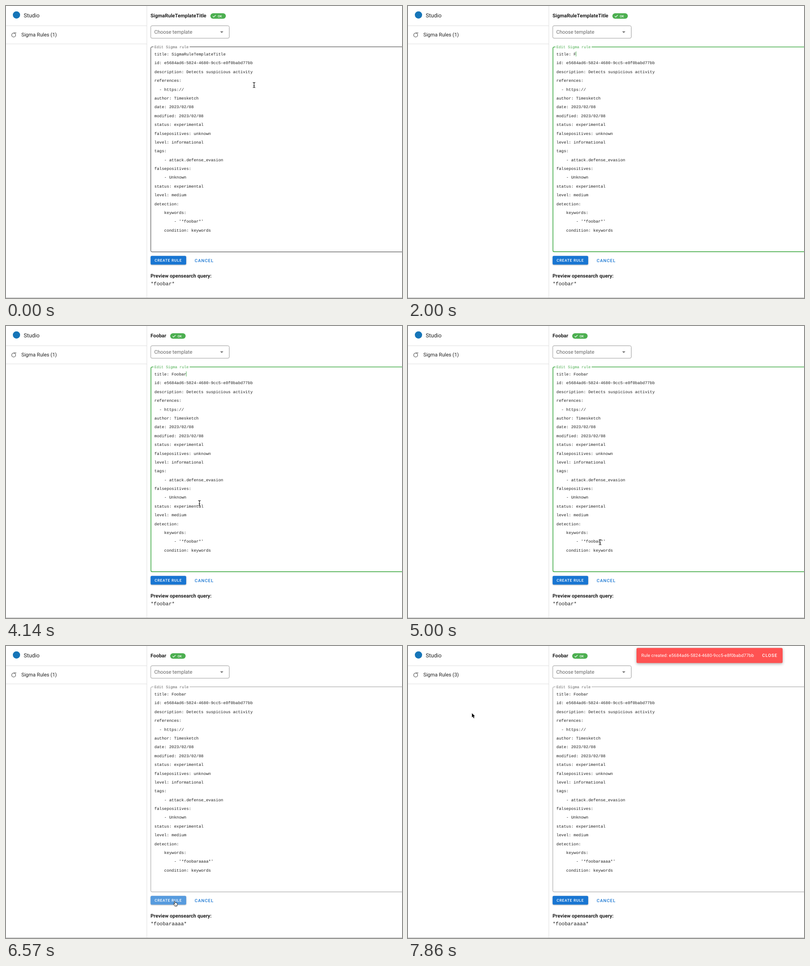
Recreate the animation shown at these times as an HTML page with a canvas. Size 870 by 643 pixels, loop 8000 ms.

```html
<!DOCTYPE html>
<html lang="en">
<head>
<meta charset="utf-8">
<title>Rule editor</title>
<style>
html, body { margin: 0; width: 100%; height: 100%; overflow: hidden; background: #fff; }
canvas { display: block; width: 870px; height: 643px; }
</style>
</head>
<body>
<canvas id="stage"></canvas>
<script>
const W = 870, H = 643, LOOP = 8000, STEP = 1000 / 7;
const canvas = document.getElementById('stage');
const ratio = window.devicePixelRatio || 1;
canvas.width = W * ratio;
canvas.height = H * ratio;
const ctx = canvas.getContext('2d');

const SANS = 'Roboto, sans-serif';
const MONO = '"Liberation Mono", monospace';
const GREEN = '#4caf50', BLUE = '#1976d2', INK = '#212121', MUTED = '#666', RULE = '#e0e0e0';
const UUID = 'e5684ad6-5824-4680-9cc5-e8f0babd77bb';
const CHAR = 5.4, LINE = 19.39, CODE_X = 326, CODE_Y = 109;

// Each track is a list of [start time, value]; a value holds until the next one.
const tracks = {
  name: [[0, 'SigmaRuleTemplateTitle'], [2000, 'F'], [2290, 'Foo'], [2570, 'Fooba'], [2860, 'Foobar']],
  heading: [[0, 'SigmaRuleTemplateTitle'], [3290, 'Foobar']],
  keyword: [[0, 'foobar'], [5140, 'foobara'], [5290, 'foobaraa'], [5430, 'foobaraaa'], [5570, 'foobaraaaa']],
  preview: [[0, '*foobar*'], [5860, '*foobaraaaa*']],
  border: [[0, 'hover'], [1000, 'focus'], [6430, 'idle'], [7570, 'hover'], [7710, 'idle']],
  selected: [[0, false], [1140, true], [2000, false]],
  caret: [[0, ''], [1000, 'name'], [1140, ''], [2000, 'name'], [3290, ''], [3710, 'name'], [4290, ''],
    [4710, 'name'], [4860, ''], [5140, 'keyword'], [6000, '']],
  shine: [[0, 0], [6000, .08], [6430, .18], [6570, .27], [6710, .18], [6860, .08], [7570, 0]],
  count: [[0, 1], [7000, 3]],
  toast: [[0, 0], [6710, .6], [6860, 1]],
  mouse: [[0, ['beam', 545, 174]], [430, ['beam', 530, 153]], [570, ['beam', 493, 117]],
    [710, ['beam', 479, 106]], [1000, ['beam', 428, 107]], [2000, null],
    [3710, ['beam', 428, 122]], [3860, ['beam', 428, 190]], [4000, ['beam', 427, 290]],
    [4140, ['beam', 425, 390]], [4290, ['beam', 423, 450]], [4430, ['beam', 422, 471]],
    [4570, ['beam', 422, 476]], [5140, null], [5570, ['beam', 501, 535]],
    [5710, ['hand', 428, 566]], [5860, ['hand', 385, 568]], [6000, ['hand', 374, 567]],
    [6140, ['hand', 372, 567]], [7570, ['beam', 335, 470]], [7710, ['arrow', 190, 236]],
    [7860, ['arrow', 140.5, 148]]]
};

function valueAt(track, t) {
  let value = track[0][1];
  for (const [start, next] of track) if (t >= start) value = next;
  return value;
}

function text(str, x, y, size, { color = INK, weight = 400, family = SANS, spacing = 0 } = {}) {
  ctx.font = `${weight} ${size}px ${family}`;
  ctx.letterSpacing = spacing + 'px';
  ctx.fillStyle = color;
  ctx.fillText(str, x, y);
}

function fillBox(x, y, w, h, color, radius = 0) {
  ctx.fillStyle = color;
  ctx.beginPath();
  ctx.roundRect(x, y, w, h, radius);
  ctx.fill();
}

function strokeLine(points, color, width) {
  ctx.strokeStyle = color;
  ctx.lineWidth = width;
  ctx.beginPath();
  points.forEach(([x, y], i) => i ? ctx.lineTo(x, y) : ctx.moveTo(x, y));
  ctx.stroke();
}

function drawSidebar(count) {
  fillBox(309, 0, 1, 642, RULE);
  fillBox(0, 43, 309, 1, RULE);
  fillBox(0, 83, 309, 1, RULE);
  fillBox(0, 642, W, 1, '#b5b5b5');
  ctx.fillStyle = '#1675b8';
  ctx.beginPath();
  ctx.arc(23, 19.7, 8, 0, 7);
  ctx.fill();
  text('Studio', 39, 25, 12.2);
  ctx.strokeStyle = MUTED;
  ctx.lineWidth = 1.3;
  ctx.beginPath();
  ctx.arc(16.8, 64, 4.3, 0, 7);
  ctx.stroke();
  strokeLine([[16.8, 59.2], [22.6, 59.2]], MUTED, 1.3);
  text(`Sigma Rules (${count})`, 33.8, 66.7, 11.1);
}

function drawHeader(heading) {
  text(heading, 317.5, 25, 11.04, { weight: 700 });
  const x = heading === 'Foobar' ? 360.7 : 449;
  fillBox(x, 16, 34, 12, GREEN, 6);
  strokeLine([[x + 5.2, 22.3], [x + 7.4, 24.4], [x + 11.8, 19.8]], '#fff', 1.1);
  text('OK', x + 16.3, 24.5, 6.9, { color: '#fff', weight: 500 });

  ctx.strokeStyle = '#9a9a9a';
  ctx.lineWidth = 1;
  ctx.beginPath();
  ctx.roundRect(318, 43.5, 172.5, 27.5, 3);
  ctx.stroke();
  text('Choose template', 325.7, 61, 11.04, { color: MUTED });
  ctx.fillStyle = '#757575';
  ctx.beginPath();
  ctx.moveTo(470.4, 55.8);
  ctx.lineTo(477.6, 55.8);
  ctx.lineTo(474, 59.4);
  ctx.fill();
}

function drawOutline(mode) {
  const color = { hover: '#333', focus: GREEN, idle: '#9a9a9a' }[mode];
  const wide = mode === 'focus' ? 1.7 : 1;
  const left = 317.6 + wide / 2, top = 89.4 + wide / 2, bottom = 542 - wide / 2;
  ctx.strokeStyle = color;
  ctx.lineWidth = wide;
  ctx.beginPath();
  ctx.moveTo(324, top);
  ctx.arcTo(left, top, left, bottom, 3);
  ctx.arcTo(left, bottom, W, bottom, 3);
  ctx.lineTo(W + 2, bottom);
  ctx.moveTo(403.5, top);
  ctx.lineTo(W + 2, top);
  ctx.stroke();
  text('Edit Sigma rule', 326, 93, 8.38, { family: MONO, color: mode === 'focus' ? GREEN : MUTED });
}

function drawEditor(s) {
  drawOutline(s.border);
  if (s.selected) fillBox(364, 96, 119, 19.5, '#b4d7ff');
  const lines = [
    'title: ' + s.name,
    'id: ' + UUID,
    'description: Detects suspicious activity',
    'references:',
    '  - https://',
    'author: Timesketch',
    'date: 2023/02/08',
    'modified: 2023/02/08',
    'status: experimental',
    'falsepositives: unknown',
    'level: informational',
    'tags:',
    '    - attack.defense_evasion',
    'falsepositives:',
    '    - Unknown',
    'status: experimental',
    'level: medium',
    'detection:',
    '    keywords:',
    `        - '*${s.keyword}*'`,
    '    condition: keywords'
  ];
  lines.forEach((line, i) => text(line, CODE_X, CODE_Y + i * LINE, 9, { family: MONO }));
  if (s.caret) {
    const onName = s.caret === 'name';
    const column = onName ? 7 + s.name.length : 12 + s.keyword.length;
    const row = onName ? 0 : 19;
    fillBox(CODE_X + column * CHAR - .6, CODE_Y - 9 + row * LINE, 1, 11, GREEN);
  }
}

function drawFooter(s) {
  ctx.save();
  ctx.shadowColor = 'rgba(0,0,0,.3)';
  ctx.shadowBlur = 2.5;
  ctx.shadowOffsetY = 1;
  fillBox(317.7, 550.3, 78.2, 19.3, BLUE, 2.8);
  ctx.restore();
  if (s.shine) fillBox(317.7, 550.3, 78.2, 19.3, `rgba(255,255,255,${s.shine})`, 2.8);
  text('CREATE RULE', 326.5, 563, 8.28, { color: '#fff', weight: 500, spacing: .74 });
  text('CANCEL', 414.5, 563.5, 9.66, { color: BLUE, weight: 500, spacing: .86 });
  text('Preview opensearch query:', 317.5, 598, 11.04, { weight: 700 });
  text(s.preview, 317.7, 615, 11.04, { family: MONO });
}

function drawToast(alpha) {
  if (!alpha) return;
  ctx.save();
  ctx.globalAlpha = alpha;
  ctx.save();
  ctx.shadowColor = 'rgba(0,0,0,.32)';
  ctx.shadowBlur = 6;
  ctx.shadowOffsetY = 2;
  fillBox(502, 4.3, 321, 33.2, '#ff5252', 2.8);
  ctx.restore();
  text('Rule created: ' + UUID, 512.6, 24.3, 9.66, { color: '#fff', spacing: .172 });
  text('CLOSE', 778, 24.3, 9.66, { color: '#fff', weight: 500, spacing: .86 });
  ctx.restore();
}

const pointers = {
  beam() {
    const shape = new Path2D('M-2.6-5.6Q0-5.6 0-4Q0-5.6 2.6-5.6M0-4V4.2M-2.6 5.8Q0 5.8 0 4.2Q0 5.8 2.6 5.8M-1.4 1.6H1.4');
    ctx.strokeStyle = '#fff';
    ctx.lineWidth = 2.4;
    ctx.stroke(shape);
    ctx.strokeStyle = '#111';
    ctx.lineWidth = 1.1;
    ctx.stroke(shape);
  },
  hand() {
    const shape = new Path2D('M-2.4-4.4Q-1.6-6-.6-4.4L.2-1.4Q1.2-2.2 1.8-1Q2.9-1.7 3.4-.5Q4.7-.8 4.8 .8L4.3 3.6L3.5 6H-.9Q-2 3.6-4.1 1.6Q-4.2 .1-2.7 .7L-1.4 1.8Z');
    ctx.fillStyle = '#fff';
    ctx.fill(shape);
    ctx.strokeStyle = '#111';
    ctx.lineWidth = .9;
    ctx.stroke(shape);
    strokeLine([[.6, 2.4], [.7, 4.6]], '#111', .6);
    strokeLine([[2.2, 2.4], [2.2, 4.6]], '#111', .6);
  },
  arrow() {
    const shape = new Path2D('M0 0V9.2L2.1 7.3L3.7 11L5.3 10.3L3.7 6.7H6.6Z');
    ctx.strokeStyle = '#fff';
    ctx.lineWidth = 1.4;
    ctx.stroke(shape);
    ctx.fillStyle = '#000';
    ctx.fill(shape);
  }
};

function drawMouse(mouse) {
  if (!mouse) return;
  const [kind, x, y] = mouse;
  ctx.save();
  ctx.translate(x, y);
  pointers[kind]();
  ctx.restore();
}

function draw(now) {
  const t = Math.floor(((now % LOOP) + 4) / STEP) * STEP + 4;
  const s = {};
  for (const key in tracks) s[key] = valueAt(tracks[key], t);
  ctx.setTransform(ratio, 0, 0, ratio, 0, 0);
  ctx.textRendering = 'geometricPrecision';
  fillBox(0, 0, W, H, '#fff');
  drawSidebar(s.count);
  drawHeader(s.heading);
  drawEditor(s);
  drawFooter(s);
  drawToast(s.toast);
  drawMouse(s.mouse);
}

const start = performance.now();
function tick() {
  draw(performance.now() - start);
  requestAnimationFrame(tick);
}
tick();
</script>
</body>
</html>
```
